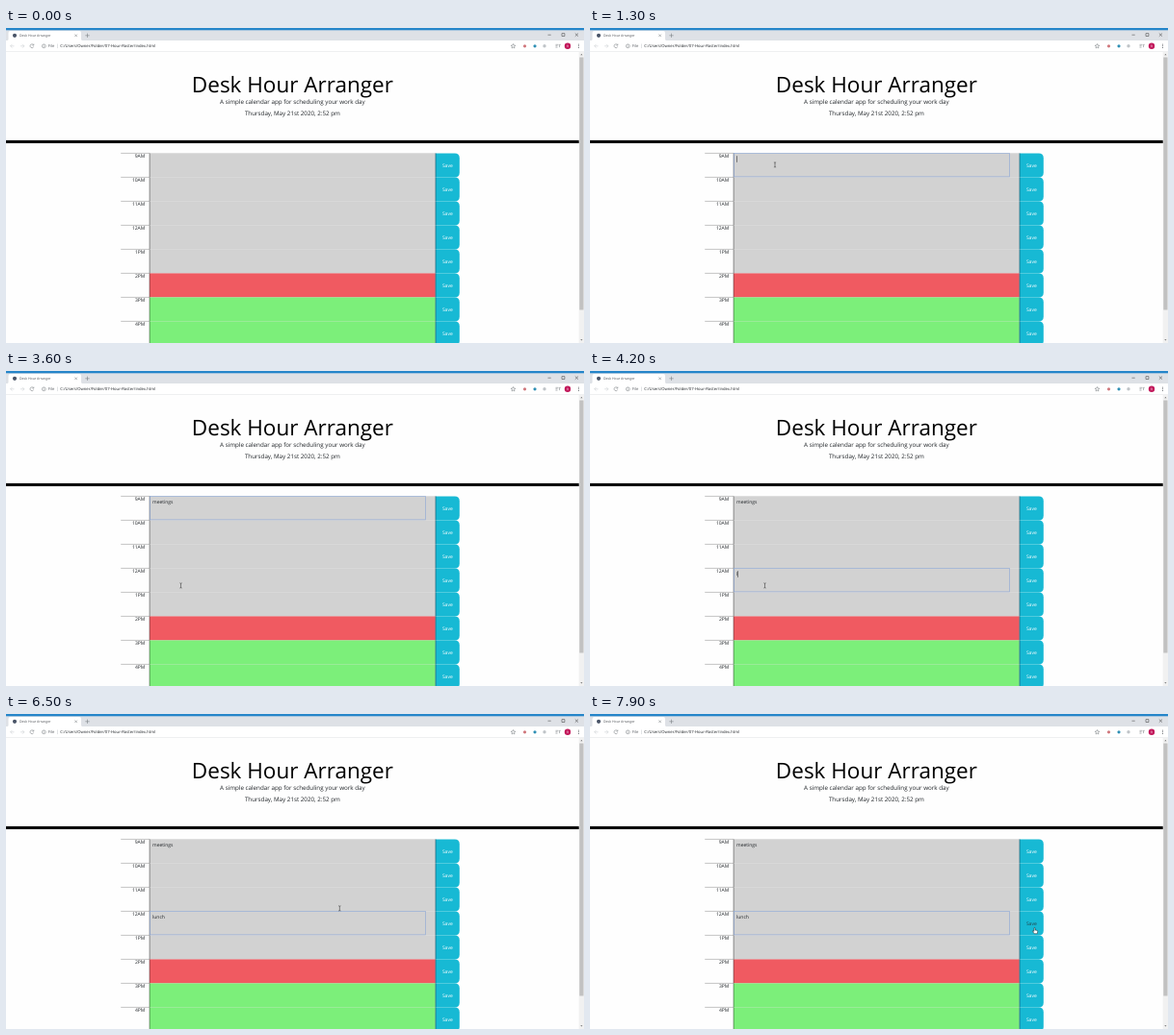
An HTML page that plays this animation: 600x328 px, repeating every 8 s.

```html
<!DOCTYPE html>
<html lang="en">
<head>
<meta charset="utf-8">
<title>Desk Hour Arranger</title>
<style>
  html, body { margin: 0; width: 100%; height: 100%; overflow: hidden; background: #fefefe; }
  svg { display: block; width: 100vw; height: 100vh; }
  text { font-family: "Open Sans", "Noto Sans", sans-serif; font-size: 5px; fill: #212529; text-rendering: geometricPrecision; }
  .mid { text-anchor: middle; }
  .end { text-anchor: end; }
  .lead { font-size: 6.25px; }
  .url { font-size: 4.2px; }
  .icon { fill: none; stroke: #6b7075; stroke-width: .5; }
  .faint { stroke: #c3c6ca; }
  .pointer { stroke: #111; stroke-width: .45; fill: #fff; }
</style>
</head>
<body>
<svg viewBox="0 0 600 328" xmlns="http://www.w3.org/2000/svg">
  <rect width="600" height="328" fill="#fefefe"/>

  <!-- browser frame -->
  <rect width="600" height="13" fill="#dee1e6"/>
  <rect width="600" height="2.3" fill="#2585c9"/>
  <path d="M1 13q1.5 0 1.5-1.5V5q0-2 2-2H76q2 0 2 2v6.5q0 1.5 1.5 1.5z" fill="#fff"/>
  <rect y="13" width="600" height="11.5" fill="#fff"/>
  <rect y="24.3" width="600" height=".4" fill="#d4d6d9"/>
  <circle cx="9" cy="7.8" r="2.1" fill="#4a5568"/>
  <text x="14" y="9.1" style="font-size:3.5px;fill:#4a4d52">Desk Hour Arranger</text>
  <g class="icon">
    <path d="M71.3 6.5l2.6 2.6m0-2.6l-2.6 2.6M82.3 7.8h4.4m-2.2-2.2v4.4"/>
    <path d="M562.5 7.2h3.2M577 5.6h2.9v2.9h-2.9zM590.8 5.5l3.2 3.2m0-3.2l-3.2 3.2" stroke="#333"/>
    <path class="faint" d="M8.5 18.8H4.6m1.9-1.9l-1.9 1.9 1.9 1.9M15 18.8h3.9m-1.9-1.9l1.9 1.9-1.9 1.9M53.5 16.5v4.6"/>
    <path d="M28.5 17.7a1.9 1.9 0 1 0 .2 1.7M28.8 16.5v1.5h-1.5"/>
    <circle cx="39.3" cy="18.8" r="1.9"/>
    <path d="M39.3 18.5v1.3m0-2.2v.4"/>
    <path d="M526.5 16.5l.7 1.6 1.7.1-1.3 1.1.4 1.7-1.5-.9-1.5.9.4-1.7-1.3-1.1 1.7-.1z"/>
    <path d="M570.5 17.3h3m-3 1.4h2m-2 1.4h2m2-2.8v2.8m0-2.8h1.3"/>
  </g>
  <text class="url" x="43.8" y="20.3" style="fill:#5f6368">File</text>
  <text class="url" x="56.3" y="20.3">C:/Users/Owner/Folder/07-Hour-Roster/index.html</text>
  <circle cx="538.5" cy="18.8" r="1.6" fill="#d0777c"/>
  <circle cx="549" cy="18.8" r="1.6" fill="#2f8fb5"/>
  <circle cx="559" cy="18.8" r="1.7" fill="#c0c4c8"/>
  <circle cx="583" cy="18.8" r="3.2" fill="#c2185b"/>
  <text class="mid" x="583" y="20" style="font-size:3.2px;fill:#fff">R</text>
  <path d="M594.5 16.7v4.2" stroke="#5f6368" stroke-width=".9" stroke-dasharray=".9 .75"/>

  <!-- scrollbar -->
  <rect x="594.7" y="24.7" width="5.3" height="303.3" fill="#f1f1f1"/>
  <rect x="595.3" y="30.5" width="4.2" height="263" fill="#c1c1c1"/>
  <path d="M596.3 28.3l1.1-1.3 1.1 1.3zM596.3 324.2l1.1 1.3 1.1-1.3z" fill="#666"/>

  <!-- page header -->
  <text class="mid" x="297.4" y="66.9" style="font-size:22.5px;fill:#000">Desk Hour Arranger</text>
  <text class="mid lead" x="297.4" y="79.4">A simple calendar app for scheduling your work day</text>
  <text class="mid lead" x="297.4" y="90.7">Thursday, May 21st 2020, 2:52 pm</text>
  <rect y="116.9" width="594.7" height="3.1" fill="#000"/>

  <g id="rows"></g>
  <rect id="focus" x="149.3" width="286.2" height="24.5" fill="none" stroke="#8aa6d6" stroke-width=".6"/>
  <rect id="caret" width=".5" height="6.6" fill="#111"/>

  <path id="arrow" class="pointer" d="M0 0v5l1.2-1.1.8 1.8.8-.4-.8-1.7h1.6z"/>
  <path id="beam" class="pointer" style="fill:none" d="M-1.1-2.6q1.1 0 1.1.6 0-.6 1.1-.6M0-2v4M-1.1 2.6q1.1 0 1.1-.6 0 .6 1.1.6"/>
  <path id="hand" class="pointer" d="M-.5.5q0-.6.5-.6t.5.6v2l2.1.4q.7.2.6.9l-.4 2.4H-.4L-2 3.8q-.2-.6.4-.6l1.1.7z"/>
</svg>
<script>
const LOOP = 8000, STEP = 100, BLINK = 550;
const TOP = 130.4, ROW = 25, LEFT = 148.9, RIGHT = 445.8, EDGE = 470.8;
const $ = id => document.getElementById(id);

function add(tag, attrs, label = "") {
  const el = document.createElementNS("http://www.w3.org/2000/svg", tag);
  for (const k in attrs) el.setAttribute(k, attrs[k]);
  el.textContent = label;
  return $("rows").appendChild(el);
}

const line = (d, stroke) => add("path", { d, stroke, "stroke-width": .5 });
const rowTop = i => TOP + i * ROW;
const rowColor = i => i < 5 ? "#d2d2d2" : i === 5 ? "#f05a61" : "#7cef7a";

const hours = ["9AM", "10AM", "11AM", "12AM", "1PM", "2PM", "3PM", "4PM"];
const saves = hours.map((hour, i) => {
  const y = rowTop(i);
  add("rect", { x: LEFT, y, width: RIGHT - LEFT, height: ROW, fill: rowColor(i) });
  line(`M${LEFT} ${y}H${RIGHT}`, "#8882");
  line(`M119.2 ${y}H${LEFT}`, "#888");
  line(`M${LEFT + .2} ${y}v${ROW}`, "#333");
  add("text", { x: 144.3, y: y + 4.5, class: "end" }, hour);
  add("path", { d: `M${RIGHT} ${y}H${EDGE - 5}q5 0 5 5v${ROW - 10}q0 5-5 5H${RIGHT}z`, fill: "#17b9d4" });
  line(`M${RIGHT + .2} ${y}v${ROW}`, "#234");
  return add("text", { x: 458.3, y: y + 14.1, class: "mid" }, "Save");
});

const burst = (count, start, gap) => Array.from({ length: count }, (_, i) => start + i * gap);
const fields = [
  { word: "meetings", row: 0, focus: 1200, keys: burst(8, 1600, 157) },
  { word: "lunch", row: 3, focus: 3700, keys: [4200, ...burst(4, 5500, 100)] }
];
for (const f of fields) f.text = add("text", { x: 152, y: rowTop(f.row) + 7.7 });

// each move bends from the last point towards (cx, cy) and ends at (x, y)
const entry = { x: 268, y: 24 };
const moves = [
  { from: 100, to: 900, cx: 80, cy: 430, x: 192, y: 142.4 },
  { from: 3100, to: 3500, cx: 190, cy: 185, x: 181.5, y: 223.4 },
  { from: 6400, to: 7100, cx: 860, cy: 150, x: 117.5, y: 73.3 },
  { from: 7100, to: 7200, cx: 300, cy: 140, x: 473, y: 214 },
  { from: 7200, to: 7700, cx: 473, cy: 250, x: 461.5, y: 222.5 }
];

function pointAt(t) {
  let p = entry;
  for (const m of moves) {
    if (t < m.from) break;
    const k = Math.min(1, (t - m.from) / (m.to - m.from));
    const bend = (a, c, b) => a * (1 - k) ** 2 + 2 * c * k * (1 - k) + b * k * k;
    p = { x: bend(p.x, m.cx, m.x), y: bend(p.y, m.cy, m.y) };
  }
  return p;
}

const show = (el, on) => el.setAttribute("visibility", on ? "visible" : "hidden");

function drawPointer(t) {
  const { x, y } = pointAt(t);
  const inRows = y >= TOP && x > LEFT && x < EDGE;
  const kind = !inRows ? "arrow" : x < RIGHT ? "beam" : "hand";
  for (const id of ["arrow", "beam", "hand"]) {
    $(id).setAttribute("transform", `translate(${x} ${y})`);
    show($(id), t >= moves[0].from && id === kind);
  }
  const over = kind === "hand" ? Math.floor((y - TOP) / ROW) : -1;
  saves.forEach((s, i) => s.style.fill = i === over ? "#24434a" : "#fff");
}

function drawFields(t) {
  let active = null, lastInput = 0;
  for (const f of fields) {
    const pressed = f.keys.filter(k => k <= t);
    f.text.textContent = f.word.slice(0, pressed.length);
    if (t >= f.focus) {
      active = f;
      lastInput = Math.max(f.focus, ...pressed);
    }
  }
  show($("focus"), active);
  show($("caret"), active && Math.floor((t - lastInput) / BLINK) % 2 === 0);
  if (!active) return;
  const y = rowTop(active.row);
  $("focus").setAttribute("y", y);
  $("caret").setAttribute("x", 152 + active.text.getComputedTextLength());
  $("caret").setAttribute("y", y + 2.8);
}

const start = performance.now();
function tick() {
  const t = Math.floor((performance.now() - start) % LOOP / STEP) * STEP;
  drawFields(t);
  drawPointer(t);
  requestAnimationFrame(tick);
}
tick();
</script>
</body>
</html>
```
